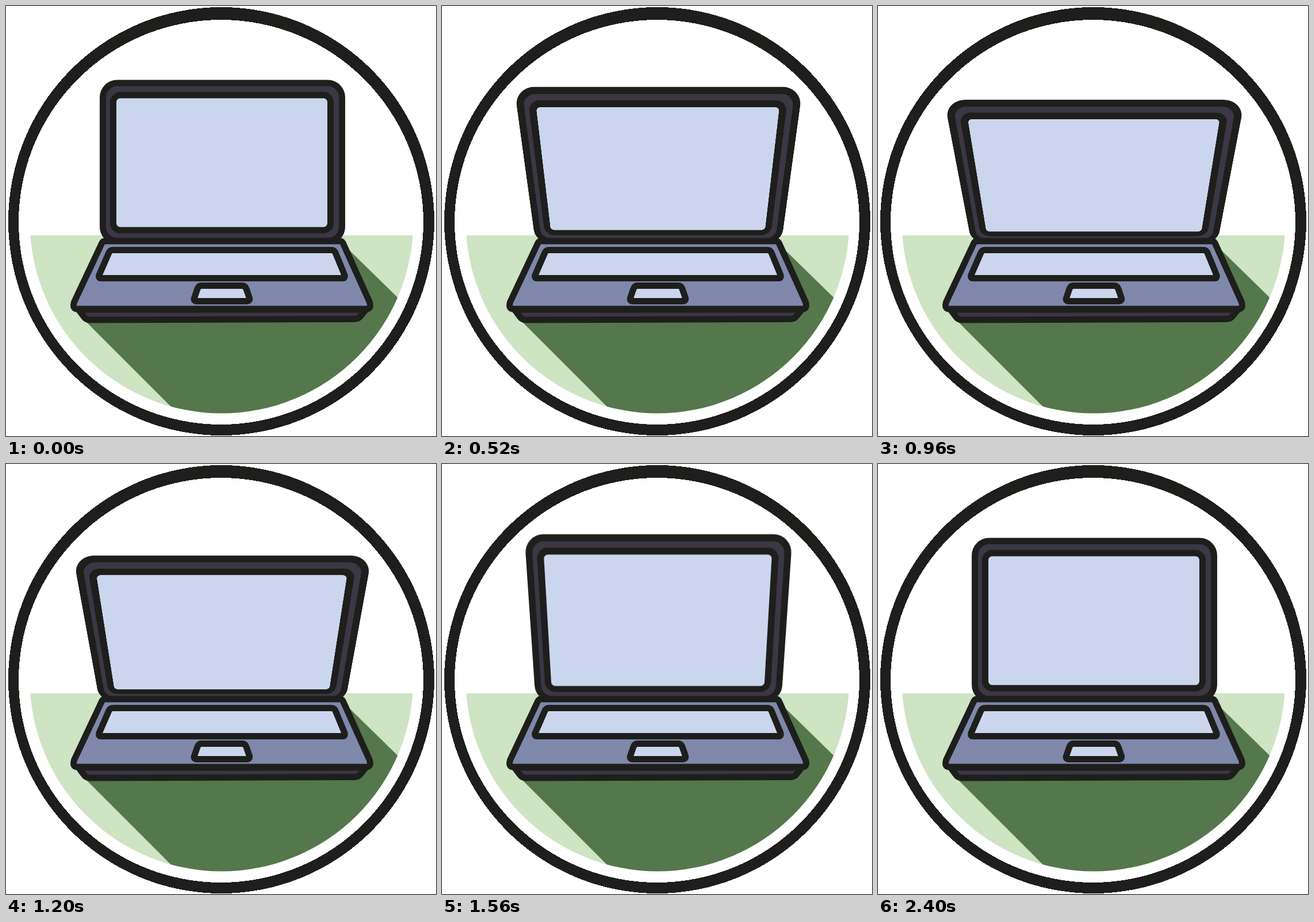
An HTML page that plays this animation: 748 px wide and 748 px high, repeating every 3040 ms.

```html
<!DOCTYPE html>
<html lang="en">
<head>
<meta charset="utf-8">
<title>Laptop</title>
<style>
  html, body { margin: 0; width: 100%; height: 100%; overflow: hidden; background: #fff; }
  .layer, svg { position: absolute; left: 0; top: 0; width: 748px; height: 748px; }
  .layer { overflow: hidden; perspective: 1020px; perspective-origin: 376.5px 355px; }
  #lid { transform-origin: 376.5px 414px; }
  .line { stroke: #1e1e1c; stroke-width: 11; stroke-linejoin: round; }
  .dark { fill: #3b3744; }
  .pale { fill: #cbd6ee; }
  .body { fill: #7f88ab; }
</style>
</head>
<body>
<svg viewBox="0 0 748 748">
  <clipPath id="ground"><circle cx="375" cy="375" r="333.5"/></clipPath>
  <g shape-rendering="crispEdges">
    <ellipse cx="374.5" cy="374.5" rx="370.5" ry="372.5" fill="#1e1e1c"/>
    <circle cx="374" cy="376" r="352" fill="#fff"/>
  </g>
  <g clip-path="url(#ground)">
    <path fill="#cee4c3" d="M0 399H748V748H0Z"/>
    <path fill="#54784b" d="M580 408L900 721V900H490L131 541Z"/>
  </g>
</svg>

<div class="layer">
  <svg id="lid" viewBox="0 0 748 748">
    <rect class="line dark" x="168.5" y="134" width="416" height="275" rx="25"/>
    <rect class="line pale" x="186.5" y="155" width="378" height="235" rx="12"/>
  </svg>
</div>

<svg viewBox="0 0 748 748">
  <path class="line dark" d="M126 528L135 540Q139 546 146 546L606 544.5Q613 544.5 617 539L626 528Z"/>
  <path class="line body" d="M172 409H581Q584 409 586 412L632.5 515Q636 527 627 527H124Q115 527 118.5 515L167 412Q169 409 172 409Z"/>
  <path class="line pale" d="M186 424.5H566Q571 424.5 573 429L589 468Q590 473.5 586 473.5H165Q160.5 473.5 162 468L179 429Q181 424.5 186 424.5Z"/>
  <path class="line pale" d="M340 486.5H411Q416 486.5 418 492L423.5 508Q424.5 513.5 419 513.5H332Q326 513.5 327.5 508L333 492Q335 486.5 340 486.5Z"/>
</svg>

<script>
const LOOP = 3040, STEP = 40, OPENED = 1000, CLOSED = 2400, MAX_TILT = 41;
const LEAD = 8; // half a display frame, keeps steps on time
const lid = document.getElementById('lid');

// Cubic Bezier easing with control points (x1, 0) and (x2, 1).
function ease(x, x1, x2) {
  let low = 0, high = 1, s;
  for (let i = 0; i < 24; i++) {
    s = (low + high) / 2;
    const r = 1 - s;
    if (3 * r * r * s * x1 + 3 * r * s * s * x2 + s ** 3 < x) low = s;
    else high = s;
  }
  return s * s * (3 - 2 * s);
}

function tiltAt(t) {
  if (t <= 0 || t >= CLOSED) return 0;
  if (t < OPENED) return MAX_TILT * ease(t / OPENED, 0.58, 0.146);
  return MAX_TILT * (1 - ease((t - OPENED) / (CLOSED - OPENED), 0.54, 0.135));
}

function draw() {
  const t = (performance.now() + LEAD) % LOOP;
  lid.style.transform = `rotateX(${-tiltAt(Math.floor(t / STEP) * STEP)}deg)`;
  requestAnimationFrame(draw);
}
draw();
</script>
</body>
</html>
```
